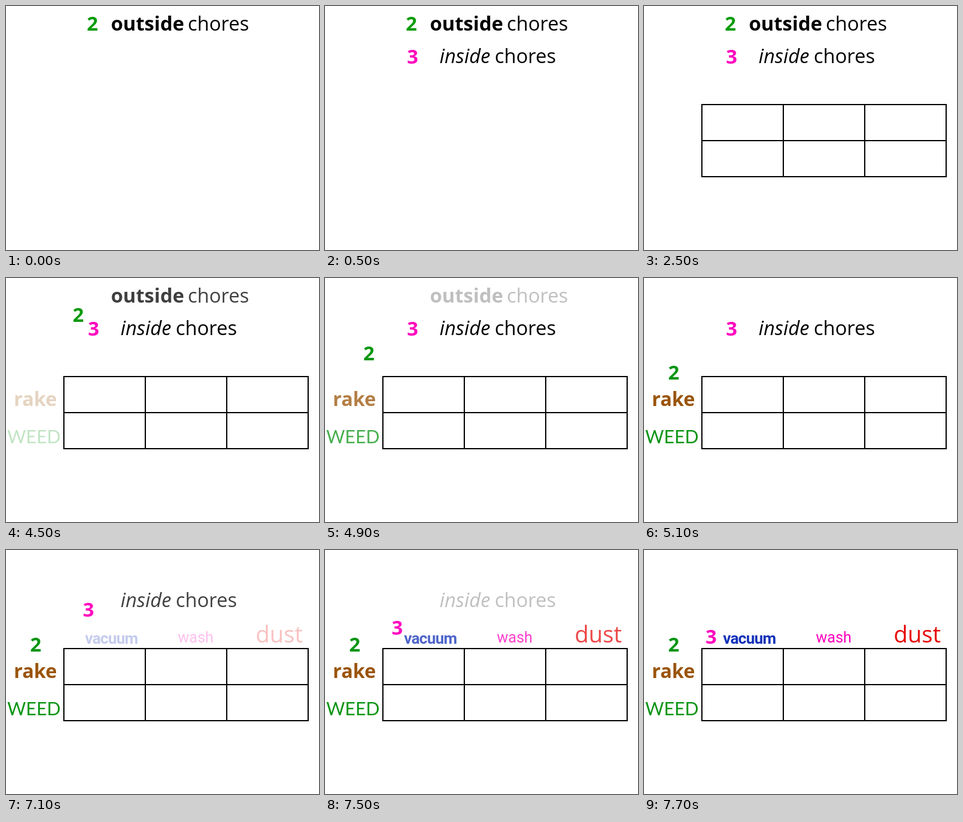
An HTML page for the animation above (8000 ms loop, 519x406 px).

```html
<!DOCTYPE html>
<html lang="en">
<head>
<meta charset="utf-8">
<title>Chores grid</title>
<style>
  html, body { margin: 0; width: 100%; height: 100%; overflow: hidden; background: #fff; }
  svg { display: block; width: 519px; height: 406px; }
  text { font: 32.5px "Open Sans", "Noto Sans", sans-serif; }
  .bold { font-weight: 700; }
  .italic { font-style: italic; }
  .grid { fill: none; stroke: #000; stroke-width: 2; }

  .two { fill: #089c08; }
  .three { fill: #ff00be; }
  .rake { fill: #9a5408; font-size: 32px; }
  .weed { fill: #0a9514; font: 30px Lato, sans-serif; }
  .vacuum { fill: #1432b9; font: 700 26px Roboto, sans-serif; letter-spacing: -.03em; }
  .wash { fill: #ff00be; font: 25px Roboto, sans-serif; }
  .dust { fill: #e60a0a; font-size: 38px; }

  /* 8 s loop; each move is four 200 ms steps, the first taken at once */
  .show-inside { animation: show-inside 8s step-end infinite; }
  .show-grid { animation: show-grid 8s step-end infinite; }
  .two { animation: move-two 8s infinite; }
  .three { animation: move-three 8s infinite; }
  .out-title { animation: fade-early 8s infinite; --from: 1; --to: 0; }
  .out-labels { animation: fade-early 8s infinite; --from: 0; --to: 1; }
  .in-title { animation: fade-late 8s infinite; --from: 1; --to: 0; }
  .in-labels { animation: fade-late 8s infinite; --from: 0; --to: 1; }

  @keyframes show-inside { 0% { opacity: 0; } 6.25%, 100% { opacity: 1; } }
  @keyframes show-grid { 0% { opacity: 0; } 31.25%, 100% { opacity: 1; } }
  @keyframes move-two {
    0%, 56.25% { transform: none; fill: #089c08; animation-timing-function: steps(4, jump-start); }
    66.25%, 100% { transform: translate(-94px, 128px); fill: #0a9514; }
  }
  @keyframes move-three {
    0%, 88.75% { transform: none; animation-timing-function: steps(4, jump-start); }
    98.75%, 100% { transform: translate(-34px, 60px); }
  }
  @keyframes fade-early {
    0%, 56.25% { opacity: var(--from); animation-timing-function: steps(4, jump-start); }
    66.25%, 100% { opacity: var(--to); }
  }
  @keyframes fade-late {
    0%, 88.75% { opacity: var(--from); animation-timing-function: steps(4, jump-start); }
    98.75%, 100% { opacity: var(--to); }
  }
</style>
</head>
<body>
<svg viewBox="0 0 519 406">
  <g class="show-grid">
    <path class="grid" d="M96 164H501V284H96ZM96 224H501M231 164V284M366 164V284"/>
  </g>

  <g class="out-title">
    <text class="bold" x="174" y="41">outside</text>
    <text x="301.5" y="41">chores</text>
  </g>
  <text class="two bold" x="134" y="41">2</text>

  <g class="show-inside">
    <g class="in-title">
      <text class="italic" x="190" y="95">inside</text>
      <text x="281.5" y="95">chores</text>
    </g>
    <text class="three bold" x="136" y="96">3</text>
  </g>

  <g class="out-labels">
    <text class="rake bold" x="13" y="213">rake</text>
    <text class="weed" x="2" y="275">WEED</text>
  </g>

  <g class="in-labels">
    <text class="vacuum" x="131" y="156">vacuum</text>
    <text class="wash" x="285" y="154">wash</text>
    <text class="dust" x="414" y="154">dust</text>
  </g>
</svg>
</body>
</html>
```
